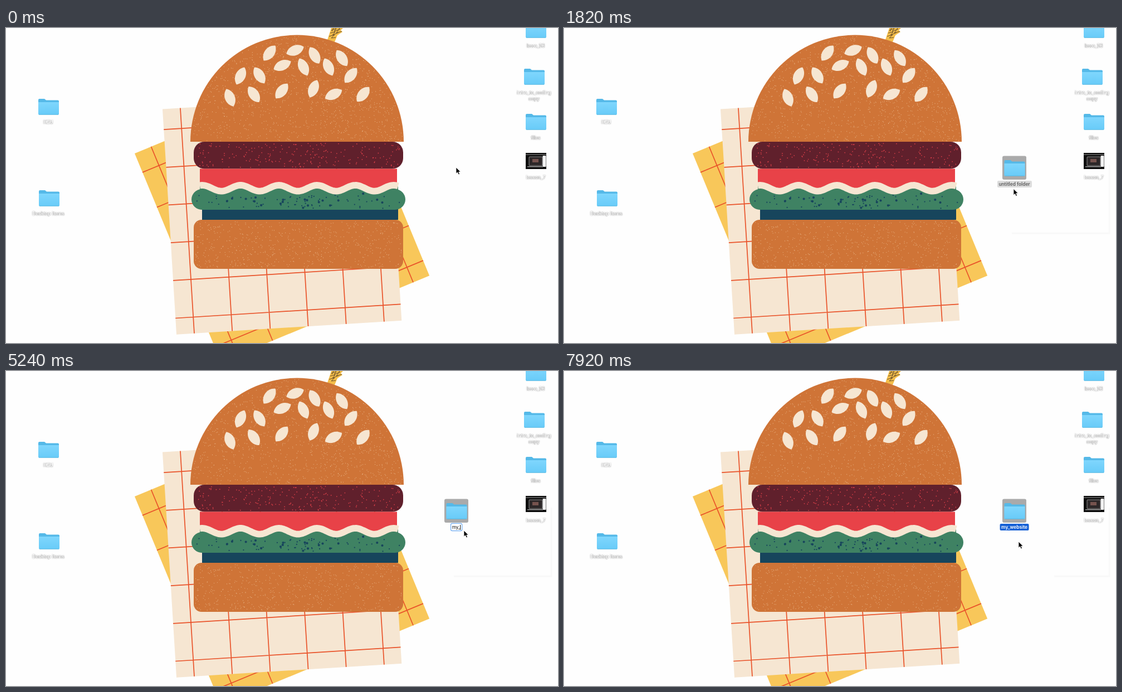
An HTML page for the animation above (8000 ms loop, 991x565 px).

```html
<!DOCTYPE html>
<html lang="en">
<head>
<meta charset="utf-8">
<title>New folder on the desktop</title>
<style>
html, body { margin: 0; width: 100%; height: 100%; overflow: hidden; background: #fefefe; }
body { position: relative; font-family: Inter, "Open Sans", sans-serif; }
svg { position: absolute; left: 0; top: 0; display: block; }
.bun { fill: #cf7437; }
.speck { fill: none; stroke-linecap: round; }
.names text {
  font-size: 8.3px; font-weight: 600; fill: #fff; text-anchor: middle;
  filter: drop-shadow(0 .6px .5px rgba(0,0,0,.5)) drop-shadow(0 .5px 1px rgba(0,0,0,.35));
}
#menu { font-size: 9.2px; fill: #1c1c1c; }
#menu .box { fill: #eeeeee; stroke: #bdbdbd; stroke-width: .7; filter: drop-shadow(0 1.5px 2px rgba(0,0,0,.28)); }
#label {
  position: absolute; left: 808.5px; top: 274px; transform: translateX(-50%);
  box-sizing: border-box; height: 12px; padding: 0 3px; border-radius: 2px;
  font-size: 8.3px; line-height: 12px; white-space: pre;
}
#label.idle { background: #dcdcdc; color: #5c5c5c; font-weight: 600; }
#label.picked { background: #1560d6; color: #fff; font-weight: 600; }
#label.plain, #label.marked, #label.typing { color: #111; background: #fff; padding: 0 2px; box-shadow: 0 0 0 1.2px #6fabf1; }
#label.marked { background: #a9d0fd; }
#label.typing::after { content: ""; display: inline-block; width: .8px; height: 9px; background: #111; vertical-align: -1.5px; }
</style>
</head>
<body>
<svg width="991" height="565" viewBox="0 0 991 565">
  <defs>
    <linearGradient id="sky" x2="0" y2="1"><stop stop-color="#7fd6fd"/><stop offset="1" stop-color="#68cbf8"/></linearGradient>
    <g id="folder">
      <path d="M0 3Q0 1 2 1H11L14 3.5H35Q37 3.5 37 5.5V28H0Z" fill="#55b9e8"/>
      <path d="M0 7H37V28Q37 29.5 35.500 29.500H1.500Q0 29.500 0 28Z" fill="url(#sky)"/>
      <path d="M1 29.300H36" stroke="#55b4de" stroke-width=".8"/>
    </g>
    <path id="seed" d="M-17 0C-9-12 9-12 17 0C9 12-9 12-17 0Z" fill="#f6e6d2"/>
    <path id="grid" fill="none" stroke="#e9532a" stroke-width="1.7"/>
  </defs>

  <g transform="translate(231 225) rotate(-22.5)"><rect width="405" height="405" fill="#f8c75a"/><use href="#grid"/></g>
  <g transform="translate(281 145.500) rotate(-3.55)"><rect width="405" height="405" fill="#f6e6d2"/><use href="#grid"/></g>

  <path d="M584 0H605L601 4L604 7L598 11L595 13L590 25L577 21Z" fill="#f3bd4a"/>
  <path d="M584 4L593 1L589 6L600 2M582 9L591 7L586 13L597 8M580 15L590 12L584 18L592 17M588 0L585 6M599 0L593 9L603 6" fill="none" stroke="#5a4528" stroke-width=".9"/>

  <path class="bun" d="M331 204A191.500 191.500 0 0 1 714 204Z"/>
  <rect class="bun" x="337" y="344" width="376" height="88" rx="14"/>
  <path id="bunDots" class="speck" stroke="#eab98c" stroke-width="1.150"/>
  <g id="seeds"></g>
  <rect x="337" y="204" width="376" height="48.500" rx="19" fill="#60202c"/>
  <path id="meatDots" class="speck" stroke="#dc3f49" stroke-width="1.700"/>
  <rect x="348" y="252.500" width="354" height="38" fill="#e84248"/>
  <rect x="352" y="325" width="352" height="19" fill="#17455c"/>
  <rect x="333" y="289" width="384" height="37" rx="18.500" fill="#3f8263"/>
  <path id="greens" fill="#3f8263"/>
  <path id="leafDots" class="speck" stroke="#17455c" stroke-width="2.300"/>
  <path id="leafBlots" class="speck" stroke="#17455c" stroke-width="4.200"/>
  <path id="mayo" fill="none" stroke="#f6e6d2" stroke-width="11.800"/>

  <use href="#folder" x="58" y="126"/>
  <use href="#folder" x="59" y="290"/>
  <use href="#folder" x="933" y="-12"/>
  <use href="#folder" x="930" y="72"/>
  <use href="#folder" x="933" y="153"/>
  <g>
    <rect x="933" y="224" width="37" height="29" fill="#0b0b0b"/>
    <rect x="933" y="226" width="37" height="2" fill="#555"/>
    <rect x="939" y="231" width="24" height="16" rx="1" fill="#2c2728" stroke="#aaa" stroke-width=".8"/>
    <rect x="945" y="235" width="11" height="6" fill="#75534e"/>
    <rect x="963.500" y="229" width="6" height="20" rx="1" fill="#f3f3f3"/>
    <rect x="936" y="248" width="28" height="1.500" fill="#999"/>
  </g>
  <g class="names">
    <text x="76" y="172">KZU</text>
    <text x="76" y="336">Desktop Items</text>
    <text x="951" y="34.500">lewo_53</text>
    <text x="948" y="119">intro_to_coding</text>
    <text x="948" y="130">copy</text>
    <text x="951" y="199.500">files</text>
    <text x="951" y="271">lesson_7</text>
  </g>

  <g id="ghost" fill="#f9f9f9">
    <rect x="977.500" y="245" width="3" height="125"/>
    <rect x="880" y="366.500" width="100" height="3.500"/>
    <rect id="ghostLeft" x="804" y="366.500" width="76" height="3.500"/>
  </g>

  <g id="fresh">
    <rect x="787" y="229.500" width="43" height="42.500" rx="3" fill="#aaa"/>
    <use href="#folder" x="790.500" y="236"/>
  </g>

  <g id="menu">
    <rect class="box" x="809" y="248" width="168" height="115" rx="4"/>
    <rect id="bar" x="809.400" y="251" width="167.200" height="13.200" fill="#4795fb"/>
    <path d="M809.500 268.500H976.500M809.500 290H976.500" stroke="#d6d6d6"/>
    <path d="M962 323.200L967.500 326.300L962 329.400ZM962 336.400L967.500 339.500L962 342.600Z"/>
    <g id="items"></g>
  </g>
</svg>
<div id="label"></div>
<svg width="991" height="565" viewBox="0 0 991 565">
  <path id="cursor" d="M0 0V11.200L2.600 8.800L4.500 13L6.500 12.100L4.700 8.100H8.200Z" fill="#000" stroke="#fff" stroke-width=".8"/>
</svg>
<script>
const $ = id => document.getElementById(id);

let seed = 7;
const rnd = () => (seed = (seed * 16807) % 2147483647) / 2147483647;

function dots(n, x, y, w, h, inside = () => true) {
  let d = "";
  while (n > 0) {
    const px = x + rnd() * w, py = y + rnd() * h;
    if (!inside(px, py)) continue;
    d += `M${px.toFixed(1)} ${py.toFixed(1)}h.01`;
    n--;
  }
  return d;
}

let lines = "";
for (let i = 0; i < 6; i++) {
  lines += `M${32 + 68.3 * i} 0v405M0 ${36.7 + 67.8 * i}h405`;
}
$("grid").setAttribute("d", lines);

const inDome = (x, y) => Math.hypot(x - 522.5, y - 204) < 189;
$("bunDots").setAttribute("d", dots(1150, 331, 13, 383, 190, inDome) + dots(640, 340, 347, 370, 82));
$("meatDots").setAttribute("d", dots(210, 342, 207, 366, 43));
$("leafDots").setAttribute("d", dots(62, 342, 300, 366, 24));
$("leafBlots").setAttribute("d", dots(20, 345, 297, 360, 26));

const seeds = [
  [473, 45, -52], [519, 40, -22], [554, 49, 61], [603, 54, 57], [496, 67, -24], [534, 70, 65],
  [579, 70, 65], [619, 85, -51], [421, 86, -65], [455, 85, 58], [402, 125, 68], [445, 119, 56],
  [495, 113, -51], [552, 109, -67], [588, 119, -26], [641, 119, -50]
];
$("seeds").innerHTML = seeds.map(([x, y, a]) =>
  `<use href="#seed" transform="translate(${x} ${y}) rotate(${a})"/>`).join("");

let wave = "";
for (let x = 348; x <= 704; x += 2) {
  const y = 287.3 - 5.3 * Math.cos((x - 421) / 68.7 * 2 * Math.PI);
  wave += `${wave ? "L" : "M"}${x} ${y.toFixed(2)}`;
}
$("mayo").setAttribute("d", wave);
$("greens").setAttribute("d", wave + "V310H348Z");

const items = [["New Folder", 261], ["Get Info", 282.3], ["Change Desktop Background...", 303.7], ["Clean Up", 317],
  ["Clean Up By", 330], ["Sort By", 343.2], ["Show View Options", 356.2]];
$("items").innerHTML = items.map(([s, y]) => `<text x="824" y="${y}">${s}</text>`).join("");
const first = $("items").firstChild;

// [time, x, y] of the pointer tip
const path = [
  [0, 808, 250], [930, 811, 252], [1080, 815, 254], [1230, 818, 255.500],
  [1680, 814, 270], [1820, 807, 288.500], [2720, 808, 288.500], [2860, 811, 288],
  [3010, 815, 287.500], [3150, 818, 287], [3300, 821, 286], [3440, 822, 286],
  [7480, 830, 261], [7630, 850, 300], [7780, 871, 374], [7920, 816, 306]
];

// [time, label style, label text]
const labels = [
  [0, "", ""], [1820, "idle", "untitled folder"], [3010, "picked", "untitled folder"],
  [3590, "plain", "untitled folder"], [3740, "marked", "untitled folder"]
];
const word = "my_website";
[4340, 4640, 5240, 5540, 5690, 5990, 6130, 6280, 6430, 6580].forEach((t, i) =>
  labels.push([t, "typing", word.slice(0, i + 1)]));
labels.push([7030, "picked", word]);

const at = (list, t) => list.findLast(s => s[0] <= t);
const show = (id, on) => { $(id).style.visibility = on ? "visible" : "hidden"; };

function draw(t) {
  const [, x, y] = at(path, t);
  $("cursor").setAttribute("transform", `translate(${x} ${y})`);

  const [, style, text] = at(labels, t);
  $("label").className = style;
  if ($("label").textContent !== text) $("label").textContent = text;
  show("label", text);

  const open = t >= 600 && t < 1680, lit = open && t >= 930;
  show("menu", open);
  show("bar", lit);
  first.style.fill = lit ? "#fff" : "";
  show("fresh", t >= 1820);
  show("ghost", t >= 1680);
  show("ghostLeft", t >= 1680 && t < 7780);
}

const start = performance.now();
function tick() {
  draw((performance.now() - start) % 8000);
  requestAnimationFrame(tick);
}
tick();
</script>
</body>
</html>
```
